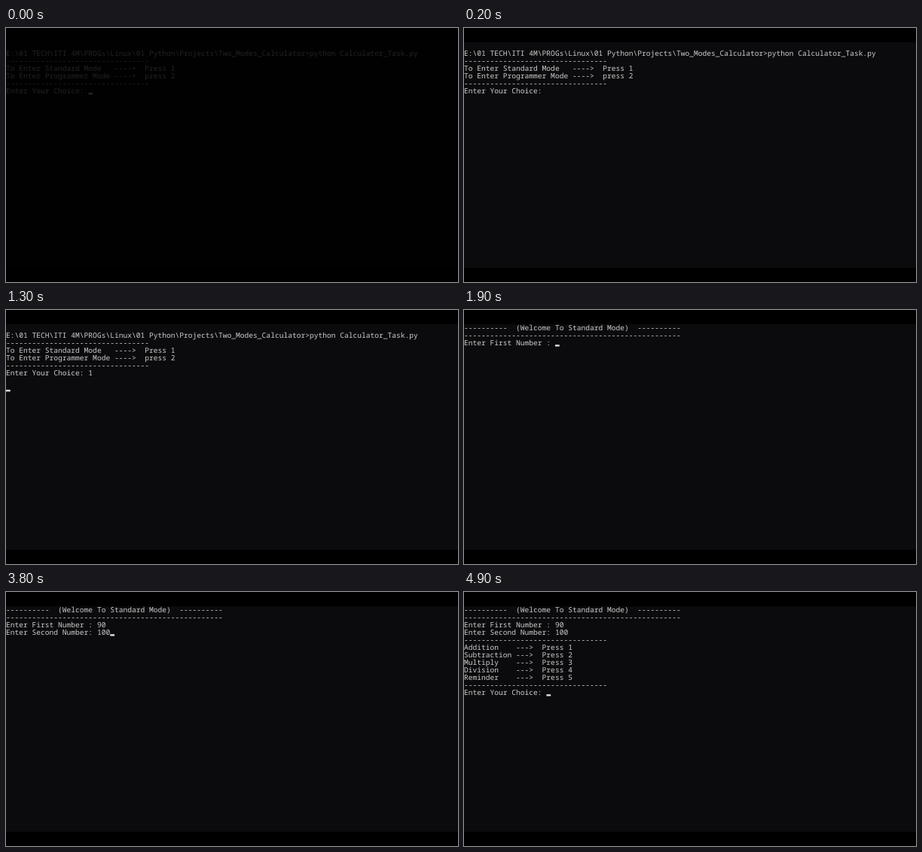
Animation of 600x338 px, one loop 5 s. Source, as an HTML page:

```html
<!DOCTYPE html>
<html lang="en">
<head>
<meta charset="utf-8">
<title>Calculator in a terminal</title>
<style>
  html, body { margin: 0; width: 100%; height: 100%; overflow: hidden; background: #000; }
  svg { display: block; width: 600px; height: 338px; }
  text {
    font: 9.6px "Noto Sans Mono", "DejaVu Sans Mono", monospace;
    font-variant-ligatures: none;
    text-rendering: geometricPrecision;
    white-space: pre;
    fill: #cdcdcd;
  }
</style>
</head>
<body>
<svg viewBox="0 0 600 338">
  <g id="screen">
    <rect y="19" width="600" height="300" fill="#0b0a0c"/>
    <g id="rows"></g>
    <rect id="cursor" width="5.76" height="2.3" fill="#e6e6e6"/>
  </g>
</svg>
<script>
const LOOP = 5000, COL = 5.76, ROW = 10, TOP = 19;
const $ = id => document.getElementById(id);
const dash = n => "-".repeat(n);

const menu = [
  "",
  "E:\\01 TECH\\ITI 4M\\PROGs\\Linux\\01 Python\\Projects\\Two_Modes_Calculator>python Calculator_Task.py",
  dash(33),
  "To Enter Standard Mode   ---->  Press 1",
  "To Enter Programmer Mode ---->  press 2",
  dash(33)
];
const choice = "Enter Your Choice: ";
const start = (typed = "") => [...menu, choice + typed];

const first = (typed = "") => [
  dash(10) + "  (Welcome To Standard Mode)  " + dash(10),
  dash(50),
  "Enter First Number : " + typed
];
const second = (typed = "") => [...first("90"), "Enter Second Number: " + typed];

const operations = ["Addition", "Subtraction", "Multiply", "Division", "Reminder"];
const picker = [
  ...second("100"),
  dash(33),
  ...operations.map((name, i) => name.padEnd(12) + "--->  Press " + (i + 1)),
  dash(33),
  choice
];

// [start in ms, lines, cursor shown at the end of the last line]
const steps = [
  [0, start(), true],
  [100, start(), false],
  [300, start(), true],
  [600, start(), false],
  [800, start(), true],
  [1100, start("1"), false],
  [1200, start("1"), true],
  [1300, [...start("1"), "", ""], true],
  [1400, first(), true],
  [1600, first(), false],
  [1900, first(), true],
  [2200, first(), false],
  [2400, first(), true],
  [2700, first("9"), true],
  [2800, first("90"), true],
  [3000, second(), true],
  [3400, second("1"), false],
  [3500, second("10"), false],
  [3700, second("100"), false],
  [3800, second("100"), true],
  [3900, picker, false],
  [4100, picker, true],
  [4600, picker, false],
  [4800, picker, true]
];

let shown;

function show(step) {
  if (step === shown) return;
  shown = step;
  const [, lines, blink] = step;
  $("rows").replaceChildren(...lines.map((line, i) => {
    const text = document.createElementNS("http://www.w3.org/2000/svg", "text");
    text.setAttribute("y", TOP + ROW * i + 7.9);
    text.textContent = line;
    return text;
  }));
  const last = lines.length - 1;
  $("cursor").setAttribute("x", lines[last].length * COL);
  $("cursor").setAttribute("y", TOP + ROW * last + 7.2);
  $("cursor").setAttribute("opacity", blink ? 1 : 0);
}

function draw(now) {
  const t = now % LOOP;
  show(steps.findLast(step => step[0] <= t));
  // quick fade from black, ten steps a second
  $("screen").setAttribute("opacity", Math.min(1, 0.16 + 0.42 * Math.floor(t / 100)));
}

let origin;
function tick(now) {
  origin ??= now;
  draw(now - origin);
  requestAnimationFrame(tick);
}
draw(0);
requestAnimationFrame(tick);
</script>
</body>
</html>
```
